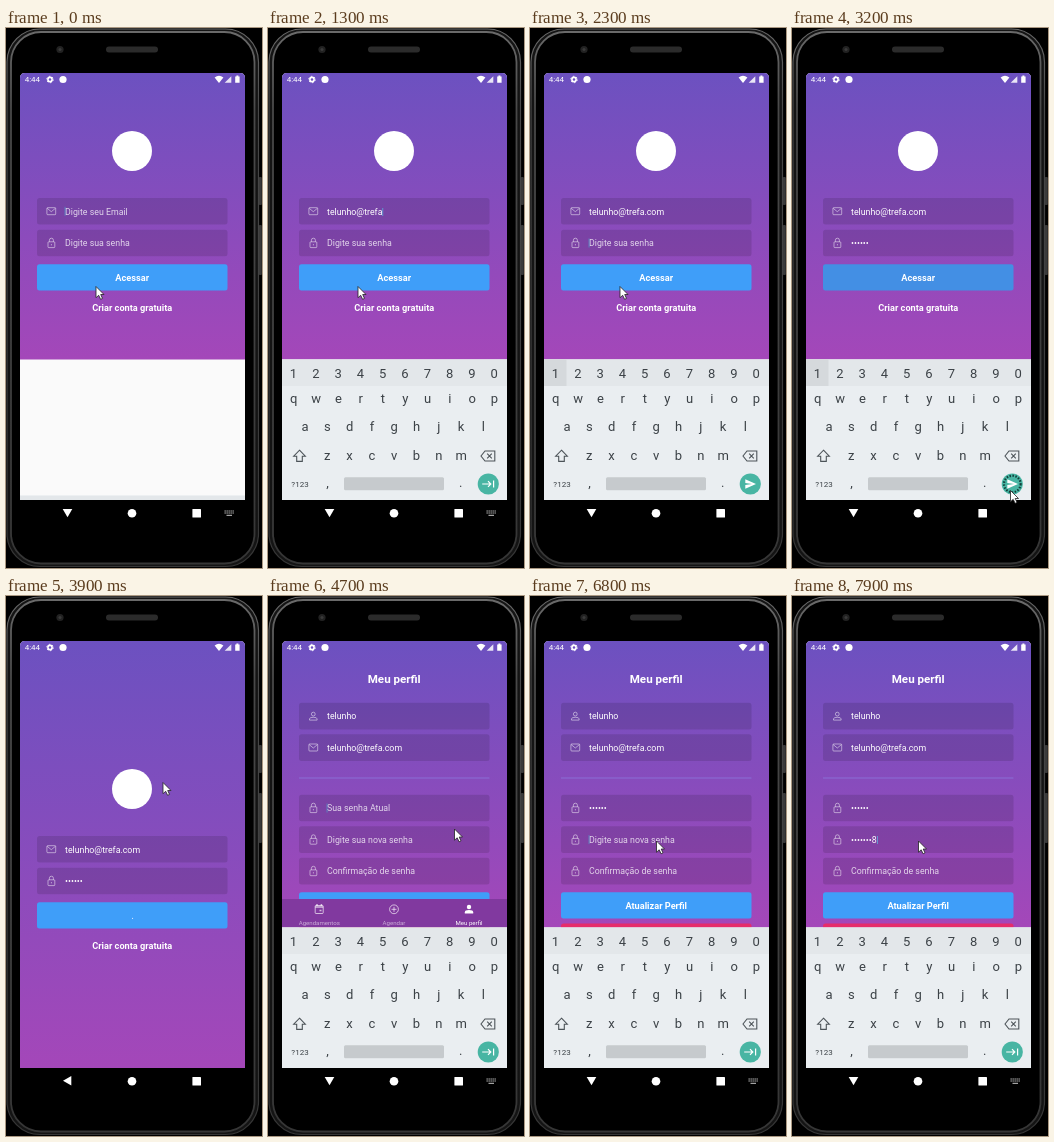
An HTML page that plays this animation: 256 px wide and 540 px high, repeating every 8000 ms.

```html
<!DOCTYPE html>
<html lang="pt-BR">
<head>
<meta charset="utf-8">
<title>Login e perfil</title>
<style>
  html, body { margin: 0; width: 100%; height: 100%; overflow: hidden; background: #000; }
  svg { display: block; width: 256px; height: 540px; font-family: Roboto, "Noto Sans", sans-serif; }
  .bold { font-weight: 700; fill: #fff; text-anchor: middle; }
  .icon { fill: none; stroke: #fff; stroke-opacity: .55; stroke-width: .9; }
  .key { font-size: 13px; fill: #3b4146; text-anchor: middle; }
</style>
</head>
<body>
<svg viewBox="0 0 256 540" xmlns="http://www.w3.org/2000/svg">
  <defs>
    <linearGradient id="bg" x1="0" y1="0" x2="0" y2="1">
      <stop offset="0" stop-color="#6c51c0"/>
      <stop offset="1" stop-color="#a447b9"/>
    </linearGradient>
    <linearGradient id="rim" x1="0" y1="0" x2="0" y2="1">
      <stop offset="0" stop-color="#6a6a6a"/>
      <stop offset=".15" stop-color="#484848"/>
      <stop offset="1" stop-color="#363636"/>
    </linearGradient>
    <clipPath id="screen"><path d="M14 472V50q0-5 5-5H234q5 0 5 5V472Z"/></clipPath>
  </defs>
  <rect width="256" height="540" fill="#000"/>
  <g fill="#3a3a3a">
    <rect x="252.8" y="149" width="3" height="28" rx="1"/>
    <rect x="252.8" y="197" width="3" height="50" rx="1"/>
  </g>
  <rect x="1" y="1" width="251.5" height="537.5" rx="33" fill="#141414" stroke="url(#rim)" stroke-width="1.2"/>
  <rect x="5" y="4" width="243.5" height="531.5" rx="30" fill="#000" stroke="url(#rim)" stroke-width="1.8"/>
  <rect x="100" y="18.5" width="52" height="6" rx="3" fill="#2b2b2b"/>
  <circle cx="54" cy="21.5" r="3.6" fill="#222"/>
  <circle cx="54" cy="21.5" r="1.5" fill="#3a3a3a"/>
  <g id="app" clip-path="url(#screen)"></g>
  <g id="nav" fill="#fff"></g>
  <path id="mouse" d="M0 0V11.2L2.7 8.8L4.6 12.8L6.5 11.9L4.7 8H8Z" fill="#fff" stroke="#222" stroke-width=".8"/>
</svg>
<script>
const LOOP = 8000, TICK = 100;
const USER = 'telunho', EMAIL = 'telunho@trefa.com';
const $ = id => document.getElementById(id);

// Piecewise linear value from [time, value] steps
function at(steps, t) {
  let i = steps.findIndex(s => s[0] > t);
  if (i < 0) return steps[steps.length - 1][1];
  if (!i) return steps[0][1];
  const [t0, a] = steps[i - 1], [t1, b] = steps[i];
  return a + (b - a) * (t - t0) / (t1 - t0);
}

// The keyboard closes for a moment as the focus passes from email to password
const keyboardOpen = [[0, .035], [100, .6], [200, 1], [1800, 1], [1900, .3], [2000, 0],
  [2100, .035], [2200, .6], [2300, 1], [3300, 1], [3400, .4], [3500, 0],
  [4500, 0], [4600, .6], [4700, 1]];
const backAngle = [[1900, 0], [2000, -90], [2200, 0], [3300, 0], [3500, 90],
  [4500, 90], [4700, 0]];
const mouseX = [[2500, 90], [3000, 218.5], [3400, 218.5], [3800, 157], [4000, 157],
  [4400, 186.5], [6400, 186.5], [6800, 126.5]];
const mouseY = [[2500, 258.5], [3000, 462.5], [3400, 462.5], [3800, 186.5], [4000, 186.5],
  [4400, 233], [6400, 233], [6800, 245]];

const typed = (t, start, step, max) => Math.max(0, Math.min(max, Math.floor((t - start) / step) + 1));

function secret(count, reveal) {
  return reveal && count ? '•'.repeat(count - 1) + count : '•'.repeat(count);
}

const icons = {
  mail: '<rect x="40.9" y="-3.6" width="8.8" height="7" rx=".8"/><path d="M41.2 -3L45.3 .4L49.4 -3"/>',
  lock: '<rect x="42" y="-1.2" width="6.8" height="5.8" rx=".8"/><path d="M43.4 -1.2V-2.8a2 2 0 0 1 4 0v1.6M45.4 1v1.4"/>',
  user: '<circle cx="45.3" cy="-2" r="1.9"/><path d="M41.5 4V2.8q0-1.6 3.8-1.6t3.8 1.6V4Z"/>'
};

function field(y, icon, value, hint, focus) {
  const caret = focus && value ? '<tspan fill="#55c5e8" dx="-.6">|</tspan>' : '';
  return `<g transform="translate(0 ${y + 13.3})">
    <rect x="31" y="-13.3" width="190.5" height="26.6" rx="2.5" fill="#000" fill-opacity=".12"/>
    <g class="icon">${icons[icon]}</g>
    <text x="59" y="3.3" font-size="8.8" fill="#fff" fill-opacity="${value ? 1 : .78}">${value || hint}${caret}</text>
    ${focus && !value ? '<rect x="58.6" y="-4.5" width=".9" height="9" fill="#46b7d8" fill-opacity=".6"/>' : ''}</g>`;
}

const bold = (y, label, size = 9.2) => `<text class="bold" x="126.2" y="${y}" font-size="${size}">${label}</text>`;

function button(y, label, fill = '#3f9ef9') {
  return `<rect x="31" y="${y}" width="190.5" height="26.2" rx="2.5" fill="${fill}"/>` + bold(y + 16.4, label);
}

function spinner(t, y) {
  const len = 1 + 9 * Math.abs(Math.sin((t - 3900) / 260));
  return `<circle cx="126.5" cy="${y}" r="3" fill="none" stroke="#dbe9ff" stroke-width="1"
    stroke-dasharray="${len} 30" transform="rotate(${80 + (t - 3900) * .6} 126.5 ${y})"/>`;
}

function login(t, small) {
  const y = small ? 0 : 70;
  const email = EMAIL.slice(0, typed(t, 250, 85, EMAIL.length));
  const dots = typed(t, 2350, 90, 6);
  const busy = t >= 3500;
  return `<circle cx="126" cy="${y + 123}" r="20" fill="#fff"/>`
    + field(y + 170, 'mail', email, 'Digite seu Email', t < 1900)
    + field(y + 201.7, 'lock', secret(dots, t < 2900), 'Digite sua senha', t >= 2100 && t < 3100)
    + button(y + 236.3, busy ? '' : 'Acessar', t >= 3100 && t < 3400 ? '#438fe4' : undefined)
    + (busy ? spinner(t, y + 249.4) : '')
    + bold(y + 283.3, 'Criar conta gratuita');
}

function tabs(y) {
  const label = (x, text, on) =>
    `<text x="${x}" y="${y + 25.8}" font-size="6.1" text-anchor="middle" fill="#fff" fill-opacity="${on ? 1 : .6}">${text}</text>`;
  return `<rect x="14" y="${y}" width="225" height="28.5" fill="#81399f"/>
    <g fill="none" stroke="#fff" stroke-opacity=".65">
      <rect x="47.2" y="${y + 6.5}" width="8" height="8" rx=".8"/>
      <path d="M47.2 ${y + 8}h8M49 ${y + 5}v2M53.4 ${y + 5}v2M51.5 ${y + 11.6}h2" stroke-width="1.5"/>
      <circle cx="126" cy="${y + 10.3}" r="4.4"/>
      <path d="M123.5 ${y + 10.3}h5M126 ${y + 7.8}v5"/>
    </g>
    <circle cx="201" cy="${y + 8}" r="2.2" fill="#fff"/>
    <path d="M196.8 ${y + 14.5}v-1.2q0-2.2 4.2-2.2t4.2 2.2v1.2Z" fill="#fff"/>`
    + label(51.3, 'Agendamentos') + label(126, 'Agendar') + label(201, 'Meu perfil', true);
}

function profile(t, small) {
  const first = typed(t, 4950, 115, 8) - typed(t, 5950, 150, 2);
  const second = typed(t, 7050, 110, 8);
  const next = t >= 6800;
  const content = bold(87.3, 'Meu perfil', 11.6)
    + field(106.8, 'user', USER)
    + field(138.3, 'mail', EMAIL)
    + '<rect x="31" y="181.5" width="190.5" height="1" fill="#8b78dc" fill-opacity=".75"/>'
    + field(198.7, 'lock', secret(first, t < 6000), 'Sua senha Atual', t >= 4500 && !next)
    + field(230.3, 'lock', secret(second, true), 'Digite sua nova senha', next)
    + field(261.8, 'lock', '', 'Confirmação de senha')
    + button(296.2, 'Atualizar Perfil')
    + button(327.6, 'Sair', '#e62d6b');
  return `<g transform="translate(0 ${small ? 0 : 22})">${content}</g>`
    + (t < 4800 ? tabs(small ? 303 : 443.7) : '');
}

function status() {
  return `<g fill="#fff"><text x="18.7" y="54.3" font-size="8">4:44</text>
    <circle cx="44" cy="51.5" r="2.1" fill="none" stroke="#fff" stroke-width="1.6"/>
    <circle cx="44" cy="51.5" r="3.2" fill="none" stroke="#fff" stroke-width="1" stroke-dasharray="1.6 1.75"/>
    <circle cx="57" cy="51.5" r="3.6"/>
    <path d="M208.6 49.5q4.4-3.6 8.8 0L213 55Z"/>
    <path d="M218.7 54.8h6.6v-6.6Z" fill-opacity=".85"/>
    <path d="M229.2 48.6h1.2v-1h2v1h1.2v6.2h-4.4Z"/></g>`;
}

function keyRow(keys, x, y) {
  return [...keys].map((k, i) => `<text class="key" x="${x + i * 22.3}" y="${y}">${k}</text>`).join('');
}

function enterKey(t) {
  const send = t >= 2100 && t < 3600, press = t >= 3100 && t < 3400;
  return `<circle cx="220.3" cy="456" r="10.6" fill="#48b5a3"/>`
    + (press ? '<circle cx="220.3" cy="456" r="8.3" fill="none" stroke="#123f3a" stroke-width="2.2" stroke-dasharray="1.5 1.5"/>' : '')
    + (send ? '<path d="M215.3 451.2L226 456L215.3 460.8V457L222 456L215.3 455Z" fill="#fff"/>'
      : `<path d="M214.2 456h8.2M220 453.2l2.8 2.8l-2.8 2.8M225.6 452.6v6.8" fill="none" stroke="#fff" stroke-width="1.2"/>`);
}

function keyboard(t) {
  const drop = (1 - at(keyboardOpen, t)) * 141;
  const marked = t >= 2300 && t < 3400;
  return `<g transform="translate(0 ${drop})">
    <rect x="14" y="331.5" width="225" height="141" fill="#eaeef1"/>
    <rect x="14" y="331.5" width="225" height="26.5" fill="#e3e7ea"/>
    ${marked ? '<rect x="14" y="331.5" width="22.5" height="26.5" fill="#d5d9dc"/>' : ''}
    ${keyRow('1234567890', 25.5, 349.8)}${keyRow('qwertyuiop', 25.8, 375.3)}
    ${keyRow('asdfghjkl', 37, 403.3)}${keyRow('zxcvbnm', 59.3, 431.7)}
    <g fill="none" stroke="#4c5358" stroke-width="1.1">
      <path d="M31.5 422.2l5.8 6h-3v5.2h-5.6v-5.2h-3Z"/>
      <path d="M213 428l4-5h9.8v10h-9.8ZM219.2 425.7l4.6 4.6M223.8 425.7l-4.6 4.6"/>
    </g>
    <text class="key" x="32" y="458.8" style="font-size:8px">?123</text>
    <text class="key" x="59.5" y="459">,</text><text class="key" x="192.8" y="459">.</text>
    <rect x="76" y="449.3" width="100" height="13" rx="1.5" fill="#c6cacd"/>
    ${enterKey(t)}</g>`;
}

function nav(t) {
  const hint = t < 2200 || t >= 4600;
  return `<path d="M-4.8 -3.8H4.8L0 4.5Z" transform="translate(61.5 484.8) rotate(${at(backAngle, t)})"/>
    <circle cx="126" cy="485.3" r="4.3"/>
    <rect x="186.4" y="481" width="8.6" height="8.6" rx=".6"/>`
    + (hint ? `<path d="M218.5 483h9.5M218.5 485h9.5" stroke="#ccc" stroke-width="1.2" stroke-dasharray="1.3 .7"/>
      <path d="M220.5 487.3h5.5" stroke="#ccc" stroke-width="1"/>` : '');
}

function draw(t) {
  const small = t < 2000 || (t >= 2100 && t < 3500) || t >= 4600;
  const height = small ? 286.5 : 427;
  const page = t < 4200 ? login : profile;
  $('app').innerHTML = `<rect x="14" y="45" width="225" height="427" fill="#fafafa"/>
    <rect x="14" y="45" width="225" height="${height}" fill="url(#bg)"/>
    <svg x="0" y="0" width="256" height="${45 + height}" style="height:${45 + height}px">${page(t, small)}</svg>
    ${status()}${at(keyboardOpen, t) > 0 ? keyboard(t) : ''}`;
  $('nav').innerHTML = nav(t);
  $('mouse').setAttribute('transform', `translate(${at(mouseX, t)} ${at(mouseY, t)})`);
}

let last = -1;
const origin = performance.now();
function loop() {
  const t = Math.floor((performance.now() - origin) % LOOP / TICK) * TICK;
  if (t !== last) draw(last = t);
  requestAnimationFrame(loop);
}
loop();
</script>
</body>
</html>
```
